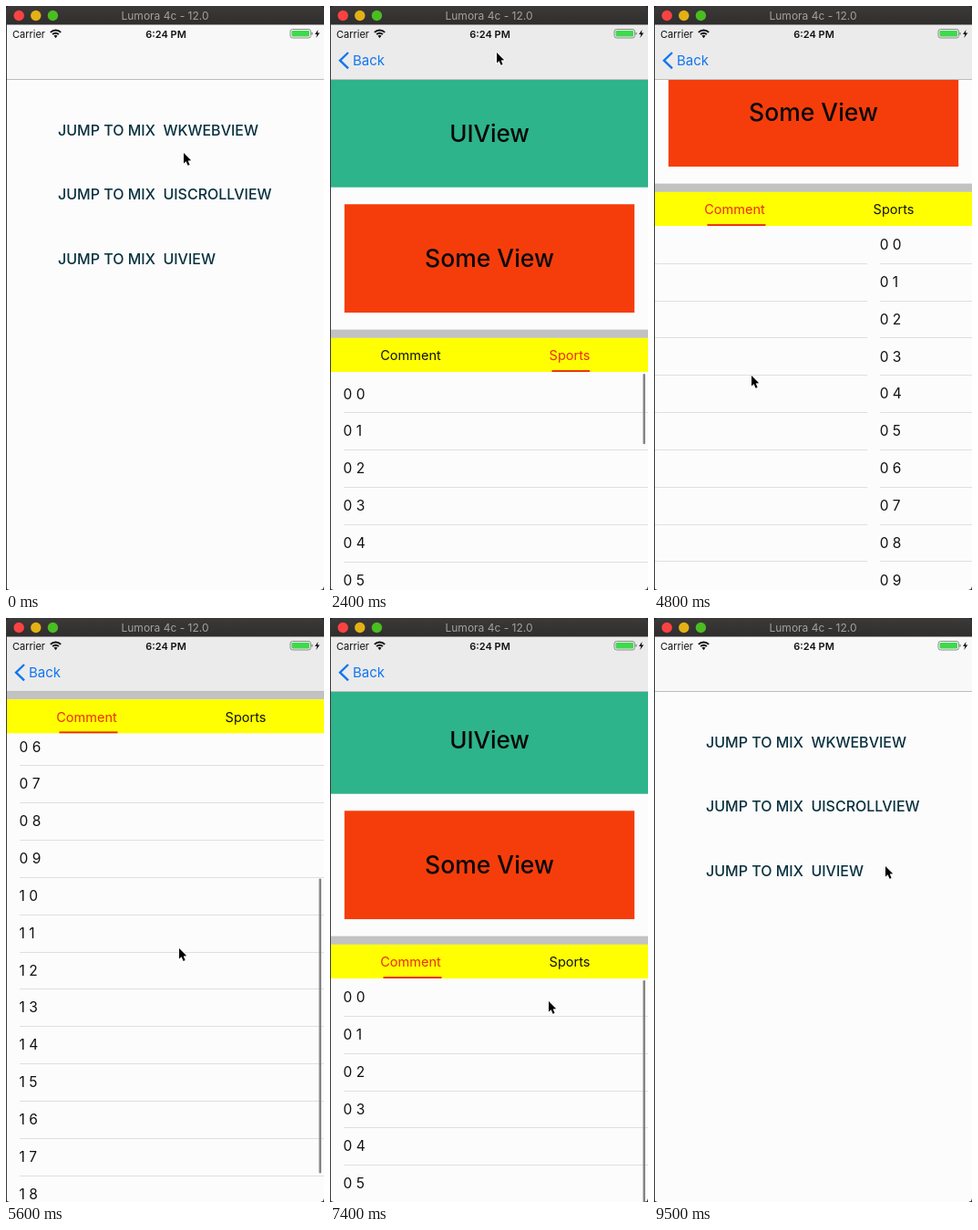
These frames come from a looping animation (349 px wide and 640 px high, 9.6 s). An HTML page with a canvas:

```html
<!DOCTYPE html>
<html lang="en">
<head>
<meta charset="utf-8">
<title>Nested scrolling demo</title>
<style>
  html, body { margin: 0; width: 100%; height: 100%; overflow: hidden; background: #fcfcfc; }
  canvas { display: block; }
</style>
</head>
<body>
<canvas id="stage" width="349" height="640"></canvas>
<script>
const ctx = document.getElementById('stage').getContext('2d');
const W = 349, H = 640, PAGE = 348, NAV = 79.9;
const LOOP = 9600, STEP = 100;
const PT = PAGE / 375;                 // one layout point in pixels
const BLOCK = 128 * PT, GAP = 20 * PT, ROW = 44 * PT, TABS = 40 * PT;
const STRIP = 10 * PT;                 // grey strip above the tabs
const HEADER = 2 * (BLOCK + GAP);      // distance the header scrolls before the tabs pin
const LIST_H = H - NAV - STRIP - TABS;
const BOTTOM = HEADER + 20 * ROW - LIST_H;
const PAPER = '#fcfcfc', INK = '#111', RED = '#ea2d0c', BLUE = '#1176f0';

// Flicks: start time, duration, scroll position reached
const flicks = [[1100, 600, 420], [1750, 650, -3.5], [2400, 200, 0],
  [2900, 700, 341], [3650, 500, 160], [5200, 800, BOTTOM], [6700, 895, 0]];
// Pointer: time, x, y
const pointer = [[0, 195, 161], [500, 200, 276], [1750, 185, 140], [2400, 183, 51], [3600, 221, 289],
  [4400, 40, 405], [4800, 107, 405], [6300, 258, 327], [7400, 240, 420], [8250, 36, 61], [9500, 254, 272]];

const clamp = (v, lo, hi) => Math.max(lo, Math.min(hi, v));
const smooth = u => (u = clamp(u, 0, 1), u * u * (3 - 2 * u));
const slowDown = u => 1 - (1 - clamp(u, 0, 1)) ** 3;

const pushed = t => smooth((t - 600) / 400) - smooth((t - 8300) / 400);
const pageX = t => PAGE * (1 - smooth((t - 4400) / 650));
const scroll = t => flicks.reduce((s, [start, length, to]) =>
  s + (to - s) * slowDown((t - start) / length), 0);

// The scroll bar stays while the list has moved within the last half second
function barAlpha(t) {
  const travel = Math.abs(scroll(t) - scroll(t - 250)) + Math.abs(scroll(t - 250) - scroll(t - 500));
  return clamp(travel, 0, 1);
}

function pointerAt(t) {
  const i = pointer.findIndex(p => p[0] > t);
  if (i < 0) return pointer[pointer.length - 1].slice(1);
  const a = pointer[i - 1], b = pointer[i];
  const u = smooth((t - a[0]) / (b[0] - a[0]));
  return [1, 2].map(k => a[k] + (b[k] - a[k]) * u);
}

function rect(x, y, w, h, color) {
  ctx.fillStyle = color;
  ctx.fillRect(x, y, w, h);
}

function round(x, y, w, h, r, color) {
  ctx.fillStyle = color;
  ctx.beginPath();
  ctx.roundRect(x, y, w, h, r);
  ctx.fill();
}

// y is the middle of the capital letters
function text(str, x, y, size, color = INK, weight = 400, align = 'left') {
  ctx.font = `${weight} ${size}px Inter, sans-serif`;
  ctx.textAlign = align;
  ctx.fillStyle = color;
  ctx.fillText(str, x, y + size * 0.364);
}

function path(points, color, width) {
  ctx.beginPath();
  points.forEach(([x, y]) => ctx.lineTo(x, y));
  if (width) {
    ctx.strokeStyle = color;
    ctx.lineWidth = width;
    ctx.stroke();
  } else {
    ctx.fillStyle = color;
    ctx.fill();
  }
}

function clipped(x, y, w, h, draw) {
  ctx.save();
  ctx.beginPath();
  ctx.rect(x, y, w, h);
  ctx.clip();
  draw();
  ctx.restore();
}

function menu(x) {
  rect(1, NAV, PAGE, H - NAV, PAPER);
  ['WKWEBVIEW', 'UISCROLLVIEW', 'UIVIEW'].forEach((name, i) =>
    text('JUMP TO MIX\u00a0 ' + name, x + 57, 136 + i * 70.6, 16, '#08303f', 500));
}

function list(x, top, offset, count, label, alpha) {
  for (let i = 0; i < count; i++) {
    const y = top - offset + i * ROW;
    if (y > H || y + ROW < top) continue;
    text(label(i), x + 13.5, y + ROW / 2, 15.5);
    rect(x + 14, Math.round(y + ROW), PAGE - 14, 1, '#dfdfdf');
  }
  const content = count * ROW;
  const size = LIST_H * LIST_H / content + Math.min(0, offset);
  const barY = top + 2 + Math.max(0, offset) * (LIST_H - 2) / content;
  ctx.globalAlpha = alpha;
  round(x + 342.5, barY, 2.5, size, 1.2, '#858585');
  ctx.globalAlpha = 1;
}

function detail(t) {
  const s = scroll(t), px = pageX(t), alpha = barAlpha(t);
  const head = clamp(s, 0, HEADER), offset = s - head;
  const y = NAV - head, someY = y + BLOCK + GAP;
  const tabs = y + HEADER + STRIP, top = tabs + TABS;
  rect(1, NAV, PAGE, H - NAV, PAPER);
  rect(1, y, PAGE, BLOCK, '#2eb48a');
  text('UIView', 175, y + BLOCK / 2, 26, '#080808', 500, 'center');
  rect(1 + 16 * PT, someY, 343 * PT, BLOCK, '#f53d0b');
  text('Some View', 175, someY + BLOCK / 2, 26.5, '#080808', 500, 'center');
  rect(1, y + HEADER, PAGE, STRIP, '#c2c2c2');

  clipped(1, top, PAGE, H - top, () => {
    list(1 - px, top, offset, 20, i => `${Math.floor(i / 10)} ${i % 10}`, alpha);
    list(1 + PAGE - px, top, offset, 80, i => '0 ' + i, alpha);
  });

  rect(1, tabs, PAGE, TABS, '#ffff02');
  const sports = px > PAGE / 2;
  text('Comment', 88.5, tabs + TABS / 2 + 0.7, 14.5, sports ? INK : RED, 400, 'center');
  text('Sports', 263, tabs + TABS / 2 + 0.7, 14.5, sports ? RED : INK, 400, 'center');
  rect(sports ? 243.5 : 58.5, top - 1.9, sports ? 41.5 : 64, 1.9, RED);
}

function statusBar() {
  text('Carrier', 7, 30.5, 11);
  text('6:24 PM', 175.5, 30.5, 11, INK, 600, 'center');
  ctx.strokeStyle = INK;
  ctx.lineWidth = 2;
  for (const r of [4.8, 8]) {
    ctx.beginPath();
    ctx.arc(54.5, 34.5, r, -Math.PI * 0.75, -Math.PI * 0.25);
    ctx.stroke();
  }
  path([[54.5, 35.2], [52.5, 32.6], [54.5, 31.8], [56.5, 32.6]], INK);
  ctx.strokeStyle = '#8a8f8a';
  ctx.lineWidth = 1;
  ctx.beginPath();
  ctx.roundRect(312, 25.5, 22.5, 9.5, 2.5);
  ctx.stroke();
  round(313.5, 27, 19.5, 6.5, 1.2, '#3fd94d');
  round(335.3, 28.8, 1.4, 3, 0.7, '#8a8f8a');
  path([[342.5, 26], [339, 31], [341.3, 31], [340.3, 35], [344.3, 29.6], [341.9, 29.6]], INK);
}

function navBar(p) {
  const shade = 248 - 13 * p;
  rect(1, 20, PAGE, 60, `rgb(${shade},${shade},${shade})`);
  rect(1, 80, PAGE, 1, '#bdbdbd');
  if (p > 0) {
    ctx.globalAlpha = p;
    path([[20, 51], [11, 59.7], [20, 68.4]], BLUE, 2.4);
    text('Back', 25 + (1 - p) * 60, 60, 15, BLUE);
    ctx.globalAlpha = 1;
  }
  statusBar();
}

function windowFrame() {
  const shade = ctx.createLinearGradient(0, 0, 0, 20);
  shade.addColorStop(0, '#3c3939');
  shade.addColorStop(1, '#302d2d');
  rect(0, 0, W, 20.5, shade);
  rect(0, 20, 1, H - 20, '#3b3b3b');
  for (const x of [0, W]) {
    for (const y of [0, H]) {
      const dx = x ? -1 : 1, dy = y ? -1 : 1;
      path([[x, y], [x + 4 * dx, y], [x + dx, y + dy], [x, y + 4 * dy]], '#222');
    }
  }
  ['#fb4243', '#e3b116', '#4abd20'].forEach((color, i) =>
    round(8.5 + i * 18.6, 4.8, 11.4, 11.4, 5.7, color));
  text('Lumora 4c - 12.0', 174.5, 11, 12, '#a4a1a1', 400, 'center');
}

function arrow(x, y) {
  ctx.save();
  ctx.translate(x, y);
  ctx.lineJoin = 'round';
  const shape = [[0, 0], [0, 11.5], [2.6, 9.2], [4.6, 13.8], [6.6, 12.9], [4.7, 8.5], [8.2, 8.2], [0, 0]];
  path(shape, '#fff', 1.8);
  path(shape, '#000');
  ctx.restore();
}

function draw(t) {
  const p = pushed(t);
  rect(0, 0, W, H, PAPER);
  clipped(1, NAV, PAGE, H - NAV, () => {
    if (p < 1) menu(-p * PAGE * 0.3);
    if (p > 0) {
      ctx.translate((1 - p) * PAGE, 0);
      detail(t);
    }
  });
  navBar(p);
  windowFrame();
  arrow(...pointerAt(t));
}

const start = performance.now();
function tick() {
  const t = (performance.now() - start) % LOOP;
  draw(Math.floor(t / STEP) * STEP);
  requestAnimationFrame(tick);
}
tick();
</script>
</body>
</html>
```
